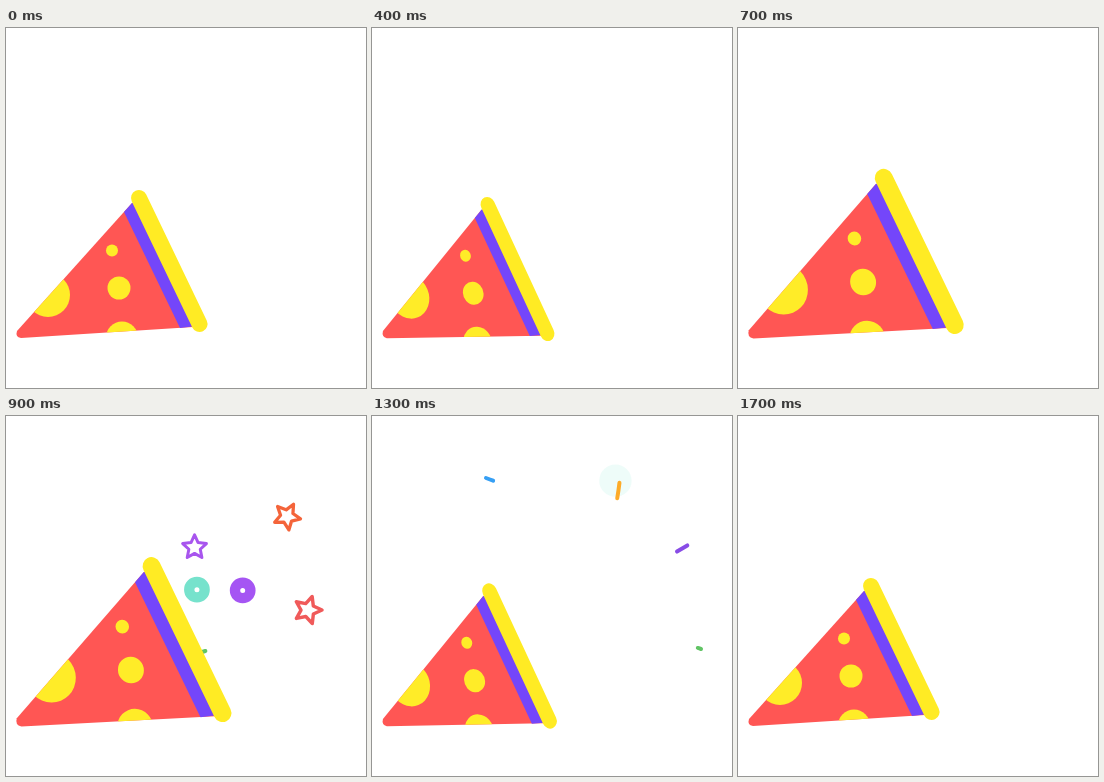
Write an HTML page with a canvas that moves like this. It is 360 px wide and 360 px high and loops after 1.8 s.

```html
<!DOCTYPE html>
<html lang="en">
<head>
<meta charset="utf-8">
<title>Pizza party popper</title>
<style>
  html, body { margin: 0; width: 100%; height: 100%; overflow: hidden; background: #fff; }
  canvas { display: block; width: 360px; height: 360px; }
</style>
</head>
<body>
<canvas id="stage" width="360" height="360"></canvas>
<script>
const ctx = document.getElementById('stage').getContext('2d');
const LOOP = 1800, STEP = 100;

const clamp = v => Math.min(1, Math.max(0, v));
const mix = (a, b, u) => a + (b - a) * u;
const quadOut = p => 1 - (1 - p) ** 2;
const sineOut = p => Math.sin(clamp(p) * Math.PI / 2);

const stars = [
  { color: '#a855ee', from: [208, 171], to: [154, 61], size: 12.5, turn: -18, life: 500 },
  { color: '#f4643a', from: [262, 124], to: [299, 78], size: 13.8, turn: 1, life: 330 },
  { color: '#f05a5a', from: [270, 172], to: [335, 217], size: 14.3, turn: -8, life: 350 }
];

const discs = [
  { color: '#76e2cc', from: [145, 269], to: [250, 51], fade: .8 },
  { color: '#a555f3', from: [140, 191], to: [361, 153], fade: .66 }
];

// In order of launch
const streamers = [
  { color: '#61c465', d: 'M190 238C215 229 280 216 329 233' },
  { color: '#369ff4', d: 'M153 203C176 162 185 118 155 87C145 74 130 68 114 62' },
  { color: '#884ce6', d: 'M167 234L255 169Q285 147 316 129' },
  { color: '#fdab28', d: 'M155 233C175 214 196 192 216 158S244 100 248 62' }
];
for (const s of streamers) {
  const path = document.createElementNS('http://www.w3.org/2000/svg', 'path');
  path.setAttribute('d', s.d);
  s.length = path.getTotalLength();
  s.path = new Path2D(s.d);
}

function drawStar({ color, from, to, size, turn, life }, t) {
  const p = (t - 800) / life;
  if (p <= 0 || p >= 1) return;
  const r = size * (1 - p ** 4), u = quadOut(p);
  ctx.save();
  ctx.translate(mix(from[0], to[0], u), mix(from[1], to[1], u));
  ctx.rotate((turn + 90 * p) * Math.PI / 180);
  ctx.scale(r, r);
  ctx.beginPath();
  for (let i = 0; i < 10; i++) {
    const a = i * Math.PI / 5, k = i % 2 ? .48 : 1;
    ctx.lineTo(k * Math.sin(a), -k * Math.cos(a));
  }
  ctx.closePath();
  ctx.lineJoin = 'round';
  ctx.lineWidth = .24;
  ctx.strokeStyle = color;
  ctx.stroke();
  ctx.restore();
}

function drawDisc({ color, from, to, fade }, t) {
  const p = (t - 700) / 800;
  if (p <= 0 || p >= fade) return;
  const u = quadOut(p), x = mix(from[0], to[0], u), y = mix(from[1], to[1], u);
  const hole = Math.max(0, 5 * (1 - 2 * p));
  ctx.globalAlpha = clamp(2.5 * (fade - p));
  ctx.fillStyle = color;
  ctx.beginPath();
  ctx.arc(x, y, 16.5 * u ** .3, 0, 2 * Math.PI);
  ctx.moveTo(x + hole, y);
  ctx.arc(x, y, hole, 0, 2 * Math.PI);
  ctx.fill('evenodd');
  ctx.globalAlpha = 1;
}

// The head runs ahead along the path and the tail catches up
function drawStreamer({ color, path, length }, t, order) {
  const head = sineOut((t - 883 - 30 * order) / 380);
  const tail = sineOut((t - 1025 - 16 * order) / 320);
  if (head <= tail) return;
  ctx.save();
  ctx.lineCap = 'round';
  ctx.lineWidth = 4;
  ctx.strokeStyle = color;
  ctx.setLineDash([(head - tail) * length, length * 2]);
  ctx.lineDashOffset = -tail * length;
  ctx.stroke(path);
  ctx.restore();
}

const TIP = [12, 307], TOP = [132, 169], BOTTOM = [195, 297];
const body = new Path2D('M11 303L126 175L187 299L15 310Q9 309 11 303Z');
const band = new Path2D('M126 175L131 175L190 298L174 300L118 184Z');
const cheese = [[42, 267, 22], [113, 260, 11.5], [106, 222.5, 6], [116, 309.5, 16]];

// Maps unit axes onto the two sides of the slice
const sides = (topX, topY, bottomX, bottomY) =>
  new DOMMatrix([topX - TIP[0], topY - TIP[1], bottomX - TIP[0], bottomY - TIP[1], ...TIP]);
const restInverse = sides(...TOP, ...BOTTOM).inverse();

// Squash, stretch and settle, while the slice leans a little
function slicePose(t) {
  const u = clamp(t / 1700) ** .93;
  const stretch = -1.04 * Math.sin(3 * Math.PI * u) * (1 - u ** 4);
  const lean = clamp(Math.min(t / 200, (1700 - t) / 300));
  return sides(
    TOP[0] + 20 * stretch - 4 * lean, TOP[1] - 18 * stretch - 5 * lean,
    BOTTOM[0] + 28 * stretch, BOTTOM[1] - 5.5 * stretch + 5.5 * lean
  ).multiply(restInverse);
}

function drawPizza(t) {
  ctx.save();
  ctx.setTransform(slicePose(t));
  ctx.save();
  ctx.fillStyle = '#ff5654';
  ctx.fill(body);
  ctx.clip(body);
  ctx.fillStyle = '#ffec28';
  for (const [x, y, r] of cheese) {
    ctx.beginPath();
    ctx.arc(x, y, r, 0, 2 * Math.PI);
    ctx.fill();
  }
  ctx.restore();
  ctx.fillStyle = '#7446fa';
  ctx.fill(band);
  ctx.lineCap = 'round';
  ctx.lineWidth = 16;
  ctx.strokeStyle = '#ffeb24';
  ctx.beginPath();
  ctx.moveTo(133, 170);
  ctx.lineTo(193.5, 296);
  ctx.stroke();
  ctx.restore();
}

function draw() {
  const t = Math.floor((performance.now() - start) % LOOP / STEP) * STEP;
  ctx.fillStyle = '#fff';
  ctx.fillRect(0, 0, 360, 360);
  discs.forEach(disc => drawDisc(disc, t));
  streamers.forEach((streamer, order) => drawStreamer(streamer, t, order));
  stars.forEach(star => drawStar(star, t));
  drawPizza(t);
  requestAnimationFrame(draw);
}
const start = performance.now();
draw();
</script>
</body>
</html>
```
